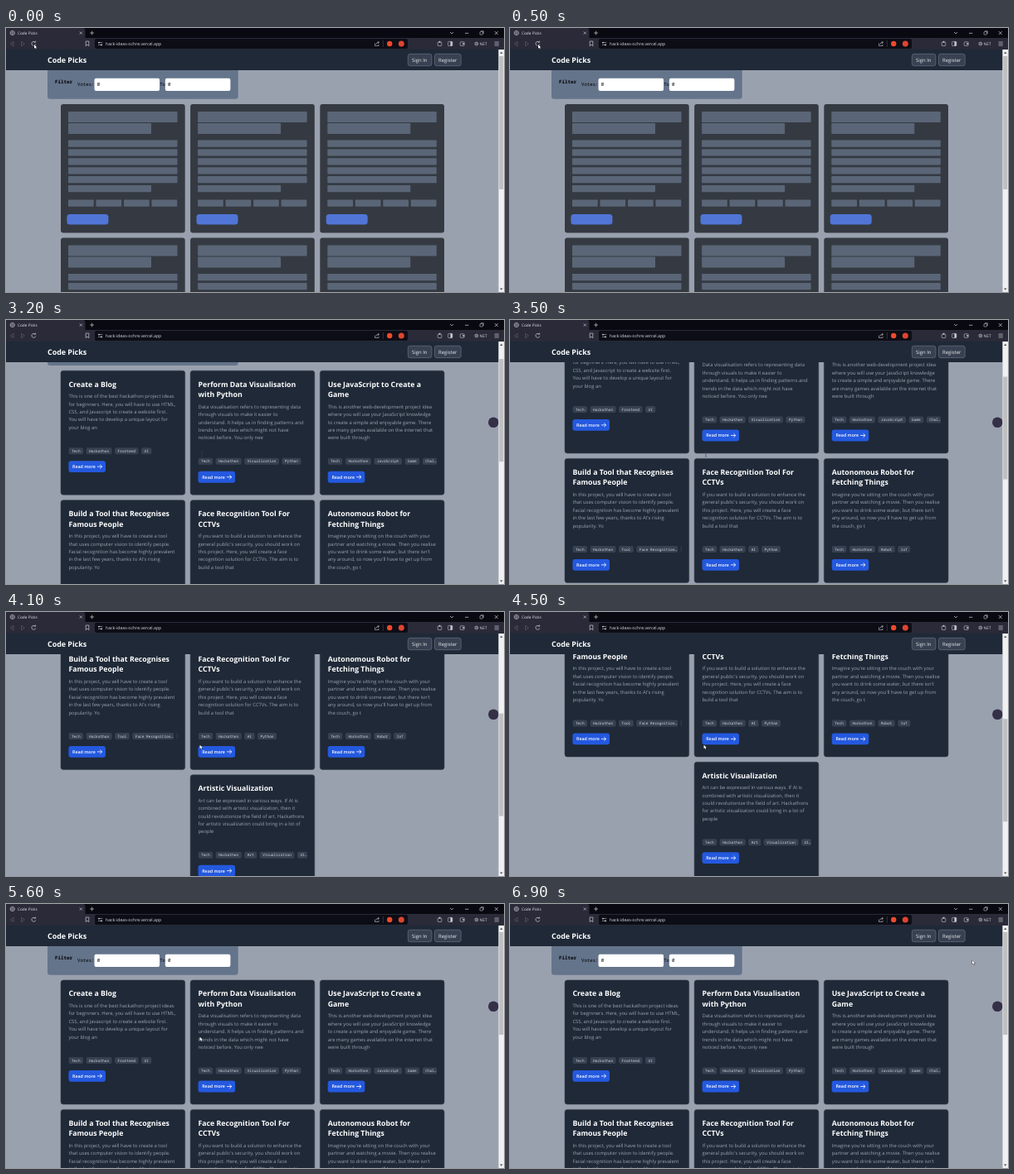
An HTML page with a canvas for the animation above (7 s loop, 600x319 px).

```html
<!DOCTYPE html>
<html lang="en">
<head>
<meta charset="utf-8">
<title>Code Picks</title>
<style>
html, body { margin: 0; width: 100%; height: 100%; overflow: hidden; background: #9aa1ae; }
canvas { display: block; width: 600px; height: 319px; }
</style>
</head>
<body>
<canvas id="stage"></canvas>
<script>
const W = 600, H = 319, LOOP = 7000, STEP = 100, LOADED = 600;
const SANS = '"Open Sans", "Noto Sans", sans-serif';
const MONO = '"Noto Sans Mono", "DejaVu Sans Mono", monospace';
const canvas = document.getElementById('stage');
const ctx = canvas.getContext('2d');
const dpr = window.devicePixelRatio || 1;
canvas.width = W * dpr;
canvas.height = H * dpr;

const COLS = [66, 222.1, 378.3], TOP = 92, CARD_W = 149.7;
const SITE = 'Code Picks';

const cards = [
  { col: 0, row: 0, title: ['Create a Blog'],
    body: ['This is one of the best hackathon project ideas', 'for beginners. Here, you will have to use HTML,',
      'CSS, and Javascript to create a website first.', 'You will have to develop a unique layout for', 'your blog an'],
    tags: ['Tech', 'Hackathon', 'Frontend', 'UI'] },
  { col: 1, row: 0, title: ['Perform Data Visualisation', 'with Python'],
    body: ['Data visualisation refers to representing data', 'through visuals to make it easier to',
      'understand. It helps us in finding patterns and', 'trends in the data which might not have', 'noticed before. You only nee'],
    tags: ['Tech', 'Hackathon', 'Visualization', 'Python'] },
  { col: 2, row: 0, title: ['Use JavaScript to Create a', 'Game'],
    body: ['This is another web-development project idea', 'where you will use your JavaScript knowledge',
      'to create a simple and enjoyable game. There', 'are many games available on the internet that', 'were built through'],
    tags: ['Tech', 'Hackathon', 'JavaScript', 'Game', 'Chal…'] },
  { col: 0, row: 1, title: ['Build a Tool that Recognises', 'Famous People'],
    body: ['In this project, you will have to create a tool', 'that uses computer vision to identify people.',
      'Facial recognition has become highly prevalent', 'in the last few years, thanks to AI\'s rising', 'popularity. Yo'],
    tags: ['Tech', 'Hackathon', 'Tool', 'Face Recognition…', 'AI'] },
  { col: 1, row: 1, title: ['Face Recognition Tool For', 'CCTVs'],
    body: ['If you want to build a solution to enhance the', 'general public\'s security, you should work on',
      'this project. Here, you will create a face', 'recognition solution for CCTVs. The aim is to', 'build a tool that'],
    tags: ['Tech', 'Hackathon', 'AI', 'Python'] },
  { col: 2, row: 1, title: ['Autonomous Robot for', 'Fetching Things'],
    body: ['Imagine you\'re sitting on the couch with your', 'partner and watching a movie. Then you realise',
      'you want to drink some water, but there isn\'t', 'any around, so now you\'ll have to get up from', 'the couch, go t'],
    tags: ['Tech', 'Hackathon', 'Robot', 'IoT'] },
  { col: 1, row: 2, title: ['Artistic Visualization'],
    body: ['Art can be expressed in various ways. If AI is', 'combined with artistic visualization, then it',
      'could revolutionize the field of art. Hackathons', 'for artistic visualization could bring in a lot of', 'people'],
    tags: ['Tech', 'Hackathon', 'Art', 'Visualization', 'UI…'] }
];

// Keys: [time, value, ...]
const scrollKeys = [[2900, 0], [3100, 14], [3500, 81], [3800, 150], [4100, 208], [4300, 223.5], [4500, 223.5], [4600, 150], [4700, 55], [4800, 0]];
const cursorKeys = [[2300, 34, 20], [2900, 236, 162], [3700, 236, 162], [4000, 233.5, 160.5], [5700, 233.5, 160.5], [6700, 557, 68]];

function sample(keys, t, i = 1, ease = k => k) {
  if (t <= keys[0][0]) return keys[0][i];
  for (let n = 1; n < keys.length; n++) {
    const a = keys[n - 1], b = keys[n];
    if (t <= b[0]) return a[i] + (b[i] - a[i]) * ease((t - a[0]) / (b[0] - a[0]));
  }
  return keys[keys.length - 1][i];
}
const smooth = k => k * k * (3 - 2 * k);

function box(x, y, w, h, fill, r = 0, stroke) {
  ctx.beginPath();
  ctx.roundRect(x, y, w, h, r);
  if (fill) { ctx.fillStyle = fill; ctx.fill(); }
  if (stroke) { ctx.strokeStyle = stroke; ctx.lineWidth = 0.6; ctx.stroke(); }
}
// y is the optical middle of the line
function text(s, x, y, size, color, weight = 400, family = SANS) {
  ctx.font = `${weight} ${size}px ${family}`;
  ctx.fillStyle = color;
  ctx.fillText(s, x, y + size * 0.34);
}
function line(points, color, width = 0.7, close = false) {
  ctx.beginPath();
  for (let i = 0; i < points.length; i += 2) ctx.lineTo(points[i], points[i + 1]);
  if (close) ctx.closePath();
  ctx.strokeStyle = color;
  ctx.lineWidth = width;
  ctx.stroke();
}
function arc(x, y, r, color, fill = true, from = 0, to = Math.PI * 2) {
  ctx.beginPath();
  ctx.arc(x, y, r, from, to);
  if (fill) { ctx.fillStyle = color; ctx.fill(); }
  else { ctx.strokeStyle = color; ctx.lineWidth = 0.7; ctx.stroke(); }
}

function drawTags(tags, x, y) {
  ctx.save();
  ctx.beginPath();
  ctx.rect(x, y - 6, CARD_W - 18.5, 12);
  ctx.clip();
  let left = x;
  for (const tag of tags) {
    const w = tag.length * 2.67 + (tag.endsWith('…') ? 4.5 : 7);
    box(left, y - 4, w, 8, '#374151', 2);
    text(tag, left + 3.5, y, 4.45, '#d8dce2', 400, MONO);
    left += w + 3.5;
  }
  ctx.restore();
}

function drawCard(card, scroll) {
  const x = COLS[card.col], y = TOP + card.row * 156.4 - scroll;
  if (y > H || y + 150 < 50) return;
  const tx = x + 9.4, shift = (card.title.length - 1) * 12.6;
  box(x, y, CARD_W, 150, '#1f2937', 3, '#374151');
  card.title.forEach((s, i) => text(s, tx, y + 16.4 + i * 12.6, 8.75, '#fff', 700));
  card.body.forEach((s, i) => text(s, tx, y + 30.8 + shift + i * 9.45, 5.9, '#9ca3af'));
  drawTags(card.tags, tx, y + 97 + shift);
  const by = y + 115.9 + shift;
  box(tx, by - 6.9, 44.6, 13.8, '#2459df', 3);
  text('Read more', tx + 4.7, by, 5.3, '#fff', 600);
  line([tx + 34.5, by, tx + 40.3, by], '#fff', 0.8);
  line([tx + 37.9, by - 2.3, tx + 40.3, by, tx + 37.9, by + 2.3], '#fff', 0.8);
}

function drawSkeleton(x, y) {
  const bar = (dx, dy, w, h) => box(x + dx, y + dy, w, h, '#5a6677', 0.8);
  box(x, y, CARD_W, 155.5, '#353a42', 3);
  bar(9, 9, 131.5, 13);
  bar(9, 23, 100, 13);
  for (let i = 0; i < 6; i++) bar(9, 43.5 + i * 10.9, i < 5 ? 131.5 : 100, 8.2);
  for (let i = 0; i < 4; i++) bar(9 + i * 33.5, 115.5, 30.7, 8.2);
  box(x + 7.4, y + 133, 50, 12.6, '#5075d6', 3.5);
}

function drawFilter(scroll) {
  const y = 51 - scroll;
  box(50, y, 229.7, 34.7, '#64748b', [0, 0, 3, 3]);
  text('Filter', 59, y + 14.3, 5.8, '#000', 700, MONO);
  text('Votes:', 86, y + 17.5, 5.7, '#000', 400, MONO);
  text('To', 185.2, y + 17.5, 5.7, '#000', 400, MONO);
  for (const x of [106.5, 191.8]) {
    box(x, y + 9.7, 78.6, 15.4, '#fff', 2);
    text('0', x + 3.2, y + 17.5, 5.7, '#000', 400, MONO);
  }
}

function drawHeader() {
  box(0, 26, 593.5, 25, '#1f2937');
  text(SITE, 50, 39, 8.9, '#fff', 700);
  box(484.3, 31.3, 28.6, 14.4, '#374151', 2.5, '#737b88');
  text('Sign In', 489, 38.7, 5.95, '#e8eaee');
  box(516.4, 31.3, 31.8, 14.4, '#374151', 2.5, '#737b88');
  text('Register', 521, 38.7, 5.95, '#e8eaee');
}

function drawScrollbar(scroll, loaded) {
  box(593.5, 26, 6.5, 293, '#f0f0f0');
  box(594.2, 34 + scroll * 0.426, 5.1, loaded ? 124 : 161, '#bfbfc0');
  for (const [y, d] of [[30, -1], [315.5, 1]]) {
    ctx.beginPath();
    ctx.moveTo(595, y - d);
    ctx.lineTo(598.6, y - d);
    ctx.lineTo(596.8, y + d * 1.2);
    ctx.fillStyle = '#555';
    ctx.fill();
  }
}

function drawBrowser() {
  const ink = '#c9cad2', dim = '#5c5c69', bar = '#2a2a39';
  box(0, 0, W, 12, '#090911');
  box(0, 0, 95.5, 13, bar, [0, 3, 0, 0]);
  box(0, 12, W, 14, bar);
  arc(7.7, 6, 2.6, ink, false);
  line([5.2, 6, 10.2, 6], ink, 0.5);
  line([7.7, 3.5, 7.7, 8.5], ink, 0.5);
  text(SITE, 14, 6, 4.75, '#e6e6ec');
  line([88.8, 4.5, 91.8, 7.5], ink);
  line([91.8, 4.5, 88.8, 7.5], ink);
  line([101.2, 6, 106, 6], ink);
  line([103.6, 3.6, 103.6, 8.4], ink);

  // window controls
  line([535, 5, 537, 7, 539, 5], ink);
  line([553, 6.3, 557.4, 6.3], ink);
  box(571, 4.6, 3.4, 3.4, null, 0.5, ink);
  line([572, 3.7, 575.3, 3.7, 575.3, 7], ink, 0.6);
  line([588.8, 4, 592.8, 8], ink);
  line([592.8, 4, 588.8, 8], ink);

  // navigation
  line([9, 16.3, 5.2, 19, 9, 21.7], dim, 0.7, true);
  line([18.5, 16.3, 22.3, 19, 18.5, 21.7], dim, 0.7, true);
  arc(33.4, 18.8, 2.5, ink, false, 0.3, 5.4);
  line([33.6, 17.3, 35.6, 17.3, 35.6, 15.6], ink);
  line([96.2, 16, 99.8, 16, 99.8, 21.7, 98, 20, 96.2, 21.7], ink, 0.7, true);

  // address field
  box(107, 13, 377, 12, '#0d0d16', 2);
  for (const [y, x] of [[17.6, 112], [20.4, 115]]) {
    line([111, y, 116.2, y], ink, 0.6);
    arc(x, y, 0.9, ink);
  }
  text('hack-ideas-ochre.vercel.app', 120, 19, 5.2, '#dcdce4');
  line([444.5, 18.5, 444.5, 21.5, 449, 21.5, 449, 19.8], ink, 0.6);
  line([446, 19.8, 447, 17.6, 449.3, 17.4], ink, 0.6);
  line([448, 16, 449.5, 17.4, 448, 18.8], ink, 0.6);
  line([454.3, 15, 454.3, 23], '#4a4a58', 0.6);
  arc(462.2, 19, 3.2, '#ee4a2b');
  arc(476.3, 19, 3.5, '#e0452f');

  // toolbar
  box(520.2, 17, 4.6, 4.6, null, 0.8, ink);
  arc(522.5, 16.7, 1, ink);
  box(532.6, 16.4, 5.2, 5.2, null, 0.8, ink);
  box(535.4, 16.4, 2.4, 5.2, ink);
  box(547.2, 16.8, 5, 4.6, null, 0.8, ink);
  box(550, 18.4, 2.2, 1.4, ink);
  arc(566.8, 19, 1.9, ink, false);
  arc(566.8, 19, 0.7, ink);
  text('NET', 570.6, 19, 4.9, '#d4d4dc');
  for (const y of [17, 19, 21]) line([588.6, y, 593.8, y], ink, 0.7);
}

function drawCursor(t) {
  const x = sample(cursorKeys, t, 1, smooth), y = sample(cursorKeys, t, 2, smooth);
  if (t >= 2900 && t < 3800) {
    const dark = '#3c424c';
    line([x - 1.2, y - 2.4, x + 1.2, y - 2.4], dark, 0.5);
    line([x, y - 2.4, x, y + 3], dark, 0.6);
    line([x - 1.2, y + 3, x + 1.2, y + 3], dark, 0.5);
    return;
  }
  const shape = [0, 0, 0, 4.8, 1.1, 3.8, 1.9, 5.5, 2.6, 5.2, 1.9, 3.5, 3.4, 3.4];
  ctx.beginPath();
  for (let i = 0; i < shape.length; i += 2) ctx.lineTo(x + shape[i], y + shape[i + 1]);
  ctx.closePath();
  ctx.strokeStyle = '#000';
  ctx.lineWidth = 0.6;
  ctx.stroke();
  ctx.fillStyle = '#fff';
  ctx.fill();
}

function draw(t) {
  const loaded = t >= LOADED, scroll = sample(scrollKeys, t);
  ctx.setTransform(dpr, 0, 0, dpr, 0, 0);
  ctx.textRendering = 'geometricPrecision';
  box(0, 0, W, H, '#9aa1ae');
  drawFilter(scroll);
  if (loaded) cards.forEach(card => drawCard(card, scroll));
  else for (const y of [TOP, TOP + 161.6]) COLS.forEach(x => drawSkeleton(x, y));
  drawHeader();
  if (loaded) arc(587.3, 123.8, 6.3, '#352f48');
  drawScrollbar(scroll, loaded);
  drawBrowser();
  drawCursor(t);
}

const start = performance.now();
function tick() {
  const t = (performance.now() - start) % LOOP;
  draw(Math.floor(t / STEP) * STEP);
  requestAnimationFrame(tick);
}
tick();
</script>
</body>
</html>
```
